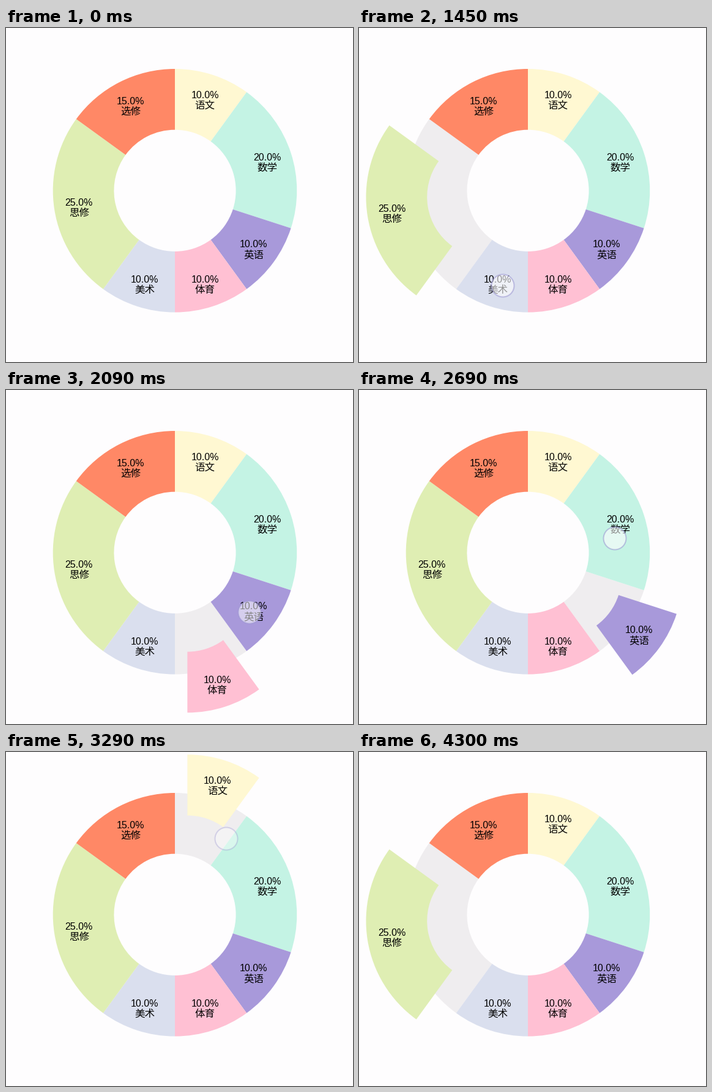
Recreate the animation shown at these times as a matplotlib script. Size 567 px wide and 547 px high, loop 5.26 s.

```python
import math
import matplotlib.pyplot as plt
from matplotlib.animation import FuncAnimation
from matplotlib.patches import Circle, Wedge

W, H, DPI = 567, 547, 64
LOOP, STEP = 5260, 20
CX, CY, R_OUT, R_IN = 276, 266.3, 199.3, 99.6
R_LABEL, POP = 158.7, 66

# subject, percent, colour; clockwise from the top
SLICES = [
    ("语文", 10, "#fff8d2"),
    ("数学", 20, "#c4f3e4"),
    ("英语", 10, "#a899da"),
    ("体育", 10, "#ffc0d3"),
    ("美术", 10, "#dadfee"),
    ("思修", 25, "#dfeeb3"),
    ("选修", 15, "#ff8866"),
]

# touch down, selection, fade end (ms), slice index, x, y
TAPS = [
    (240, 400, 650, 5, 132, 350),
    (1330, 1510, 1720, 4, 235, 422),
    (1730, 1850, 2030, 3, 325, 418),
    (2030, 2230, 2450, 2, 398, 364),
    (2590, 2750, 2980, 1, 418, 243),
    (3050, 3210, 3400, 0, 360, 142),
    (3400, 3520, 3760, 6, 240, 148),
    (3870, 4020, 4300, 5, 134, 356),
]

fig = plt.figure(figsize=(W / DPI, H / DPI), dpi=DPI, facecolor="#fefdfe")
ax = fig.add_axes([0, 0, 1, 1])
ax.set_xlim(0, W)
ax.set_ylim(H, 0)
ax.axis("off")


def pt(px):
    return px * 72 / DPI


def ring_piece(a0, a1, color, z):
    piece = Wedge((CX, CY), R_OUT, a0, a1, width=R_OUT - R_IN,
                  facecolor=color, linewidth=0, zorder=z)
    return ax.add_patch(piece)


def label(text, font, px):
    return ax.text(0, 0, text, family=font, fontsize=pt(px), color="black",
                   ha="center", va="baseline")


class Slice:
    def __init__(self, name, percent, color, start):
        self.a0 = start * 3.6 - 90
        self.a1 = (start + percent) * 3.6 - 90
        mid = math.radians((self.a0 + self.a1) / 2)
        self.dir = math.cos(mid), math.sin(mid)
        self.wedge = ring_piece(self.a0, self.a1, color, 2)
        self.value = label(f"{percent:.1f}%", "Liberation Sans", 16)
        self.name = label(name, "Noto Sans CJK JP", 16.5)

    def place(self, popped):
        shift = POP if popped else 0
        ux, uy = self.dir
        self.wedge.set_center((CX + shift * ux, CY + shift * uy))
        x = CX + (R_LABEL + shift) * ux
        y = CY + (R_LABEL + shift) * uy
        self.value.set_position((x, y - 0.3))
        self.name.set_position((x, y + 16.5))
        z = 4 if popped else 2
        self.wedge.set_zorder(z)
        self.value.set_zorder(z + 1)
        self.name.set_zorder(z + 1)


slices, total = [], 0
for name, percent, color in SLICES:
    slices.append(Slice(name, percent, color, total))
    total += percent

slot = ring_piece(0, 1, "#efedef", 1)
touch = ax.add_patch(Circle((0, 0), 18.5, zorder=9, linewidth=pt(2)))


def touch_strength(t, down, select, end):
    if t < select:
        return min(1, 0.35 + (t - down) / 90)
    return 1 - (t - select) / (end - select)


def draw(i):
    t = i * STEP
    selected = None
    touch.set_visible(False)
    for down, select, end, index, x, y in TAPS:
        if t >= select:
            selected = index
        if down <= t < end:
            k = touch_strength(t, down, select, end)
            touch.set_visible(True)
            touch.set_center((x, y))
            touch.set_facecolor((1, 1, 1, 0.58 * k))
            touch.set_edgecolor((0.6, 0.58, 0.82, 0.55 * k))
    for n, piece in enumerate(slices):
        piece.place(n == selected)
    slot.set_visible(selected is not None)
    if selected is not None:
        slot.set_theta1(slices[selected].a0)
        slot.set_theta2(slices[selected].a1)
    return []


anim = FuncAnimation(fig, draw, frames=LOOP // STEP, interval=STEP,
                     init_func=lambda: draw(0), repeat=True, repeat_delay=0)
plt.show()
```
